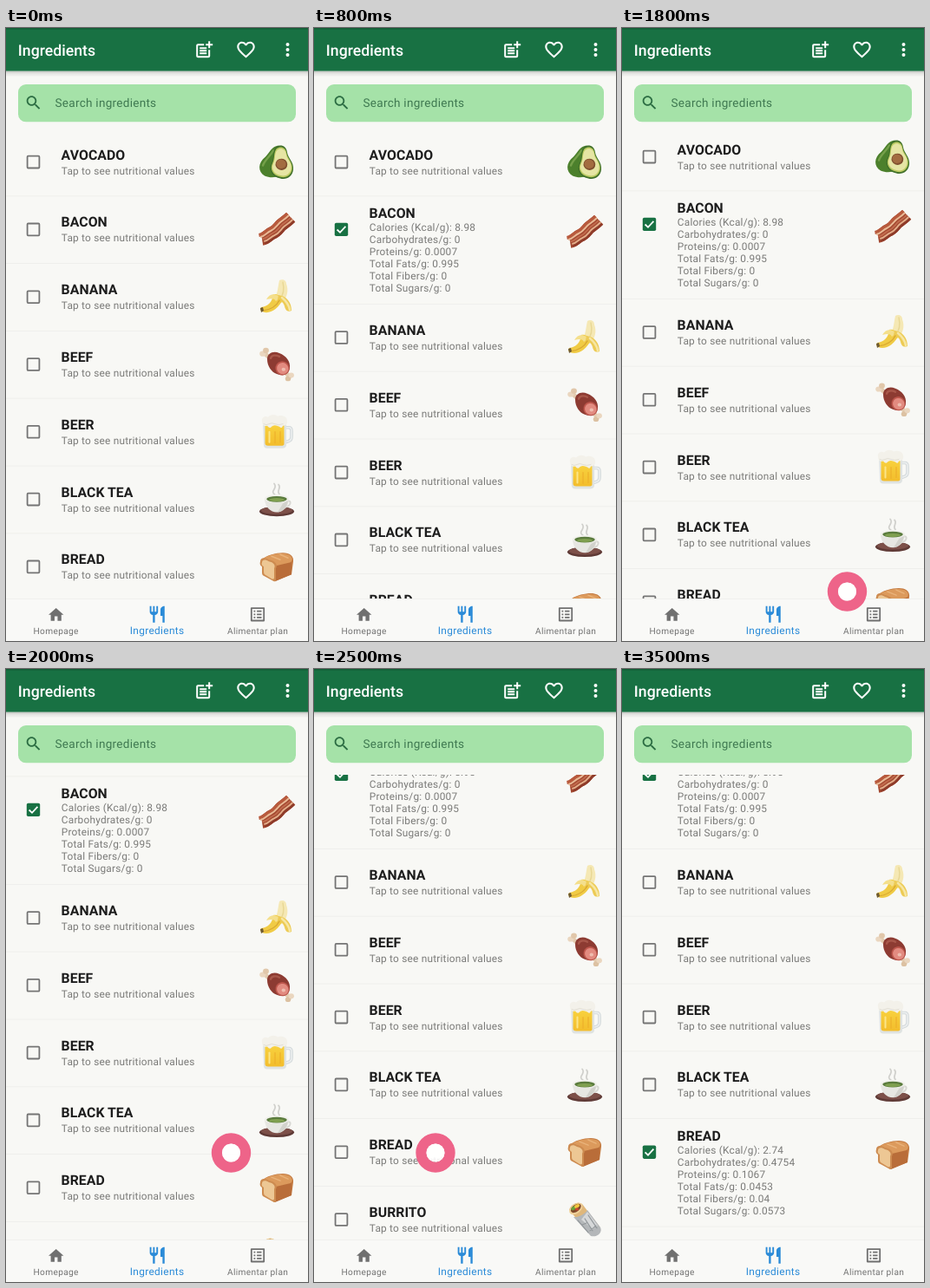
Write an HTML page that moves like this. It is 348 px wide and 707 px high and loops after 3.7 s.

```html
<!DOCTYPE html>
<html lang="en">
<head>
<meta charset="utf-8">
<title>Ingredients</title>
<style>
html, body { margin: 0; width: 100%; height: 100%; overflow: hidden; background: #f8f8f5; }
svg { display: block; }
text { font-family: Roboto, "Liberation Sans", sans-serif; text-rendering: geometricPrecision; }
.bar { font-size: 17.7px; font-weight: 500; fill: #fff; }
.hint { font-size: 13.55px; letter-spacing: .27px; fill: #3f7951; }
.name { font-size: 15.8px; font-weight: 700; letter-spacing: .05px; fill: #1d1d1d; }
.sub { font-size: 11.86px; letter-spacing: .21px; fill: #7a7a78; }
.tab { font-size: 10.16px; letter-spacing: .33px; fill: #737373; text-anchor: middle; }
.tab.on { font-size: 11.86px; fill: #2b8bd8; }
</style>
</head>
<body>
<svg id="stage" width="348" height="707" viewBox="0 0 348 707">
  <defs>
    <clipPath id="listClip"><rect y="122" width="348" height="536"/></clipPath>
    <linearGradient id="shade" x2="0" y2="1">
      <stop stop-color="#000" stop-opacity=".22"/>
      <stop offset=".4" stop-color="#000" stop-opacity=".08"/>
      <stop offset="1" stop-color="#000" stop-opacity="0"/>
    </linearGradient>
    <linearGradient id="ale" x2="0" y2="1">
      <stop stop-color="#f8d23f"/><stop offset="1" stop-color="#f3bd2c"/>
    </linearGradient>
  </defs>
  <rect width="348" height="707" fill="#f8f8f5"/>
  <g id="list" clip-path="url(#listClip)"></g>
  <rect x="14" y="65" width="320" height="43.3" rx="9" fill="#a5e2a8"/>
  <text class="hint" x="56.5" y="91">Search ingredients</text>
  <rect y="49.6" width="348" height="7" fill="url(#shade)"/>
  <rect width="348" height="49.6" fill="#187143"/>
  <rect width="348" height="1.5" fill="#125c36"/>
  <text class="bar" x="13.8" y="32">Ingredients</text>
  <rect y="658" width="348" height="49" fill="#f9f9f7"/>
  <path d="M0 658.5H348" stroke="#f0f0ed"/>
  <text class="tab" x="57.7" y="699">Homepage</text>
  <text class="tab on" x="174.1" y="698.7">Ingredients</text>
  <text class="tab" x="290.1" y="699">Alimentar plan</text>
  <g id="icons"></g>
  <path id="touch" fill="#ee6489" fill-rule="evenodd"/>
  <circle id="core" fill="#fff"/>
</svg>
<script>
const LOOP = 3700, STEP = 100;
const TOP = 116, PITCH = 77.8, GROW = 46.8;
const $ = id => document.getElementById(id);
const shape = (d, fill) => `<path d="${d}" fill="${fill}"/>`;
const line = (d, color, w, cap = "round") =>
  `<path d="${d}" fill="none" stroke="${color}" stroke-width="${w}" stroke-linecap="${cap}" stroke-linejoin="round"/>`;
const oval = (x, y, rx, ry, fill, turn = 0) =>
  `<ellipse cx="${x}" cy="${y}" rx="${rx}" ry="${ry}" fill="${fill}" transform="rotate(${turn} ${x} ${y})"/>`;

// Interface icons on a 24-unit grid: centre x, centre y, scale, colour, path
const icons = [
  [228.2, 25.3, 1, "#fff", "M17 19H5V7h7V5H5c-1.1 0-2 .9-2 2v12c0 1.1.9 2 2 2h12c1.1 0 2-.9 2-2v-7h-2zM19 2h-2v3h-3v2h3v3h2V7h3V5h-3zM7 9h8v2H7zM7 12h8v2H7zM7 15h8v2H7z"],
  [276.5, 25, 1.02, "#fff", "M16.5 3c-1.74 0-3.41.81-4.5 2.09C10.91 3.81 9.24 3 7.5 3 4.42 3 2 5.42 2 8.5c0 3.78 3.4 6.86 8.55 11.54L12 21.35l1.45-1.32C18.6 15.36 22 12.28 22 8.5 22 5.42 19.58 3 16.5 3zm-4.4 15.55l-.1.1-.1-.1C7.14 14.24 4 11.39 4 8.5 4 6.5 5.5 5 7.5 5c1.54 0 3.04.99 3.57 2.36h1.87C13.46 5.99 14.96 5 16.5 5c2 0 3.5 1.5 3.5 3.5 0 2.89-3.14 5.74-7.9 10.05z"],
  [324.5, 25, 1, "#fff", "M14 6a2 2 0 1 0-4 0a2 2 0 1 0 4 0zM14 12a2 2 0 1 0-4 0a2 2 0 1 0 4 0zM14 18a2 2 0 1 0-4 0a2 2 0 1 0 4 0z"],
  [31.7, 86.3, .89, "#2c6d43", "M15.5 14h-.79l-.28-.27C15.41 12.59 16 11.11 16 9.5 16 5.91 13.09 3 9.5 3S3 5.91 3 9.5 5.91 16 9.5 16c1.61 0 3.09-.59 4.23-1.57l.27.28v.79l5 4.99L20.49 19l-4.99-5zm-6 0C7.01 14 5 11.99 5 9.5S7.01 5 9.5 5 14 7.01 14 9.5 11.99 14 9.5 14z"],
  [57.7, 676.8, .87, "#707070", "M10 20v-6h4v6h5v-8h3L12 3 2 12h3v8z"],
  [174.2, 676.2, .95, "#2b8bd8", "M11 9H9V2H7v7H5V2H3v7c0 2.12 1.66 3.84 3.75 3.97V22h2.5v-9.03C11.34 12.84 13 11.12 13 9V2h-2v7zm5-3v8h2.5v8H21V2c-2.76 0-5 2.24-5 4z"],
  [290, 676.3, .9, "#707070", "M19 5v14H5V5h14m1.1-2H3.9c-.5 0-.9.4-.9.9v16.2c0 .4.4.9.9.9h16.2c.4 0 .9-.5.9-.9V3.9c0-.5-.5-.9-.9-.9zM11 7h6v2h-6V7zm0 4h6v2h-6v-2zm0 4h6v2h-6zM7 7h2v2H7zm0 4h2v2H7zm0 4h2v2H7z"]
];
$("icons").innerHTML = icons.map(([x, y, s, color, d]) =>
  `<path d="${d}" fill="${color}" transform="translate(${x} ${y}) scale(${s}) translate(-12 -12)"/>`).join("");

// Food pictures in a 40-unit box
const wave = "M3 31C9 30 10 26 15 24S22 18 25 15S31 11 36 6";
const strip = (shift, color, w) => `<g transform="translate(${shift * .64} ${shift * .77})">${line(wave, color, w, "butt")}</g>`;
const half = "M19 3C24-1 31 1 32 9C33 16 40 20 39 29C38 37 31 41 24 39C14 37 10 29 14 21C17 15 15 8 19 3Z";
const inner = (s, fill) => `<g transform="translate(26 21) scale(${s}) translate(-26 -21)">${shape(half, fill)}</g>`;
const food = {
  avocado:
    shape("M22 1C14 2 12 9 7 14C-2 21-2 31 6 36C15 40 27 37 30 29Z", "#4c802c") +
    line("M16 7C12 14 6 18 4 24", "#75a04a", 2.4) +
    shape(half, "#41702a") + inner(.9, "#bccb62") + inner(.81, "#e6e5a4") +
    oval(25.4, 22.8, 6.9, 6.6, "#80502f", 20) + oval(25, 22.3, 5.6, 5.2, "#a36c40", 20),
  bacon:
    strip(0, "#a2472f", 15) + strip(-5.5, "#b85a3d", 4) + strip(5.5, "#8f3b29", 4) +
    strip(-3, "#e9b995", 2) + strip(3.6, "#e3ad89", 2) + strip(.4, "#c06a4c", 2),
  banana:
    shape("M23 1C27-1 31 1 31 5C34 13 32 21 26 27L15 25C21 19 21 10 23 1Z", "#f5e8b4") +
    line("M27 3C29 12 27 19 23 23", "#e8d794", 1.4) +
    shape("M16 17C20 16 25 19 27 23C22 34 11 41 3 37L1 35L2 32C10 31 15 26 16 17Z", "#f0cb45") +
    shape("M17 17C13 17 10 19 8 23C13 22 17 21 19 25L25 20Z", "#f4df8c") +
    shape("M22 18C31 19 37 26 37 36C32 38 30 35 29 31C28 27 25 24 21 23Z", "#edcb55") +
    line("M26 21C31 25 34 30 35 35", "#f6e6a3", 2.6) +
    line("M4 36C13 35 20 30 23 24", "#d9a832", 1.3) +
    shape("M1 33L4 32L5 36L2 38Z", "#6e5a33"),
  beef:
    line("M6 7L13 14", "#e3cbb0", 5) + oval(3.8, 7.8, 3.6, 3.1, "#ead6bf") + oval(7.5, 4, 3.4, 3.1, "#e1c7aa") +
    line("M29 29L35 34", "#e3cbb0", 5) + oval(33, 36.5, 3.2, 2.9, "#dcc1a2") + oval(36.7, 32.6, 3.2, 3, "#ead6bf") +
    shape("M9 14C9 7 16 4 23 7C31 10 36 17 35 24C34 32 27 34 20 31C14 29 9 22 9 14Z", "#8d3b32") +
    line("M13 13C14 9 19 9 23 11", "#a8574a", 2.4) +
    oval(26.5, 24.5, 8.2, 8, "#bd564c", 35) + oval(26.8, 24.8, 6.8, 6.5, "#e28b80", 35) +
    oval(27.8, 25.8, 2.2, 2, "#efbcae"),
  beer:
    line("M30 15H34Q37 15 37 19V26Q37 30 33 31L30 32", "#d3d9db", 3.6) +
    line("M30 15H34Q37 15 37 19V26Q37 30 33 31L30 32", "#eef1f1", 1.4) +
    shape("M4 8H31V35Q31 39 26 39H9Q5 39 5 35Z", "#dfe3e2") +
    shape("M6.5 11H28.5V34Q28.5 36 25 36H10Q6.5 36 6.5 33Z", "url(#ale)") +
    line("M11.5 20V32", "#fbe588", 2) + line("M18 20V33M24 20V32", "#edb02b", 1.2) +
    shape("M3 8C2 3 7 1 10 3C13-1 19 0 21 2C25 0 32 2 32 7C33 12 29 13 27 13Q26 17 23 14Q17 11 14 14Q12 17 9 13C5 14 3 12 3 8Z", "#f3f1ea") +
    line("M5 11Q8 13 11 11T18 11T27 11", "#e2dfd5", 1),
  tea:
    line("M18 15C11 10 22 8 17 2M23 14C19 10 26 7 22 3", "#d0d0cc", 1.7) +
    oval(20, 34, 20, 5.8, "#5f3a36") + oval(20, 32.8, 18, 4.4, "#7d5049") +
    line("M32 22C38 21 36 28 30 29", "#d8d8d3", 2) +
    shape("M6 19H34C34 29 27 35 20 35S6 29 6 19Z", "#e7e7e2") +
    shape("M27 25C30 23 32 22 33 22C32 29 27 34 21 35Z", "#d2d2cc") +
    oval(20, 19.2, 14, 4.6, "#f1f1ec") + oval(20, 19.8, 11.8, 3.4, "#5a7b3d") + oval(20, 20.6, 9, 2, "#80a050"),
  bread:
    shape("M3 12C7 7 19 4 27 4C35 4 40 8 39 14L37 29L17 37L6 26Z", "#c47b42") +
    shape("M18 19L37 13L37 29L18 37Z", "#b96d39") +
    shape("M4 11C10 6 26 3 33 6C38 8 39 12 36 15L19 19Z", "#dc9a5c") +
    shape("M1 14C1 9 7 9 11 12C17 13 22 17 19 22V36Q18 38 15 36L4 30Q3 29 3 27V20C1 19 0 17 1 14Z", "#cd8b50") +
    shape("M3 15C3 12 7 11 11 14C16 15 19 18 17 22V33Q17 35 14 34L6 29Q5 28 5 26V20C3 19 2 17 3 15Z", "#edc794") +
    line("M14 8L24 12M24 6L33 10", "#e9b27a", 1.5),
  burrito:
    shape("M2 9C4 2 12-1 17 2L37 28C41 34 33 41 27 38Z", "#dfb77b") +
    oval(9.8, 7.5, 8.6, 5.6, "#f0d29b", -38) + oval(9.8, 7, 6.8, 4, "#7f4a2b", -38) +
    oval(7, 7, 3, 2, "#6ca23a", -30) + oval(11, 4.5, 3.2, 2, "#f3c83f", -30) + oval(11, 8, 2, 1.5, "#cd4733") +
    shape("M7 17C12 18 20 14 23 9L38 29C41 35 34 41 27 39Z", "#b4b7b9") +
    shape("M16 20L23 11L35 27L29 31Z", "#d6d8d9") +
    line("M12 21L24 35M20 19L29 33M24 15L34 30M17 26L22 24M26 33L33 27", "#92979a", 1.1)
};

const facts = (...v) => ["Calories (Kcal/g)", "Carbohydrates/g", "Proteins/g", "Total Fats/g", "Total Fibers/g", "Total Sugars/g"]
  .map((label, i) => `${label}: ${v[i]}`);

const rows = [
  { name: "AVOCADO", art: "avocado" },
  { name: "BACON", art: "bacon", open: 200, check: 600, facts: facts(8.98, 0, .0007, .995, 0, 0) },
  { name: "BANANA", art: "banana" },
  { name: "BEEF", art: "beef" },
  { name: "BEER", art: "beer" },
  { name: "BLACK TEA", art: "tea" },
  { name: "BREAD", art: "bread", open: 2600, check: 3000, facts: facts(2.74, .4754, .1067, .0453, .04, .0573) },
  { name: "BURRITO", art: "burrito" }
];

const show = (el, on) => el.setAttribute("visibility", on ? "inherit" : "hidden");
const part = (row, cls) => row.el.querySelector("." + cls);

$("list").innerHTML = rows.map(r => `<g>
  <path class="rule" stroke="#efefec"/>
  <rect class="off" x="24.6" y="31.7" width="13.8" height="13.8" rx="1" fill="none" stroke="#747474" stroke-width="1.8"/>
  <g class="on"><rect x="23.8" y="30.9" width="15.4" height="15.4" rx="1.8" fill="#187143"/>
    <path d="M26.6 38.7L30 42L36.4 35" fill="none" stroke="#fff" stroke-width="1.8"/></g>
  <text class="name" x="63.6">${r.name}</text>
  <text class="sub tip" x="63.8" y="52.6">Tap to see nutritional values</text>
  <g class="more">${(r.facts || []).map((f, i) => `<text class="sub" x="63.8" y="${40.2 + i * 14.1}">${f}</text>`).join("")}</g>
  <g class="art">${food[r.art]}</g></g>`).join("");
rows.forEach((r, i) => {
  r.el = $("list").children[i];
});

// Scroll offset: time, pixels
const scrolls = [[0, 0], [1800, 6], [1900, 36], [2000, 70], [2100, 98], [2200, 111]];
// Finger: time, x, y, outer radius, opacity
const PRESS = 22.7;
const touches = [
  [0, 0, 0, 0, 0],
  [100, 140, 232, PRESS, 1], [200, 140, 232, 29, .75], [300, 140, 232, 35, .35],
  [400, 24, 228, PRESS, 1], [500, 24, 228, 33, .48], [600, 24, 228, 38, .18], [700, 0, 0, 0, 0],
  [1600, 259.5, 676, PRESS, 1], [1800, 259.5, 650, PRESS, 1], [1900, 259.5, 598, PRESS, 1], [2000, 259.5, 558, PRESS, 1],
  [2300, 259.5, 558, 33, .5], [2400, 0, 0, 0, 0],
  [2500, 140, 558, PRESS, 1], [2600, 140, 558, 29, .75], [2700, 140, 558, 35, .35],
  [2800, 29, 565, PRESS, 1], [2900, 29, 565, 34, .75], [3000, 29, 565, 38, .3], [3100, 0, 0, 0, 0]
];
const at = (table, t) => table.filter(row => row[0] <= t).pop();
const ring = (x, y, r) => `M${x - r} ${y}a${r} ${r} 0 1 0 ${2 * r} 0a${r} ${r} 0 1 0 ${-2 * r} 0z`;

function draw(t) {
  let y = TOP - at(scrolls, t)[1];
  for (const r of rows) {
    const open = t >= r.open, checked = t >= r.check;
    const height = PITCH + (open ? GROW : 0);
    r.el.setAttribute("transform", `translate(0 ${y})`);
    part(r, "rule").setAttribute("d", `M0 ${height}H348`);
    part(r, "name").setAttribute("y", open ? 25.5 : 35.6);
    part(r, "art").setAttribute("transform", `translate(292 ${open ? 21.5 : 18.5})`);
    show(part(r, "tip"), !open);
    show(part(r, "more"), open);
    show(part(r, "on"), checked);
    show(part(r, "off"), !checked);
    y += height;
  }
  const [, x, ty, radius, alpha] = at(touches, t);
  const hole = radius > PRESS ? 9.5 : 10.5;
  $("touch").setAttribute("d", radius ? ring(x, ty, radius) + ring(x, ty, hole) : "");
  $("touch").setAttribute("opacity", alpha);
  $("core").setAttribute("cx", x);
  $("core").setAttribute("cy", ty);
  $("core").setAttribute("r", radius ? hole : 0);
  $("core").setAttribute("opacity", alpha * .9);
}

const start = performance.now();
function tick() {
  const t = (performance.now() - start) % LOOP;
  draw(Math.floor(t / STEP) * STEP);
  requestAnimationFrame(tick);
}
tick();
</script>
</body>
</html>
```
